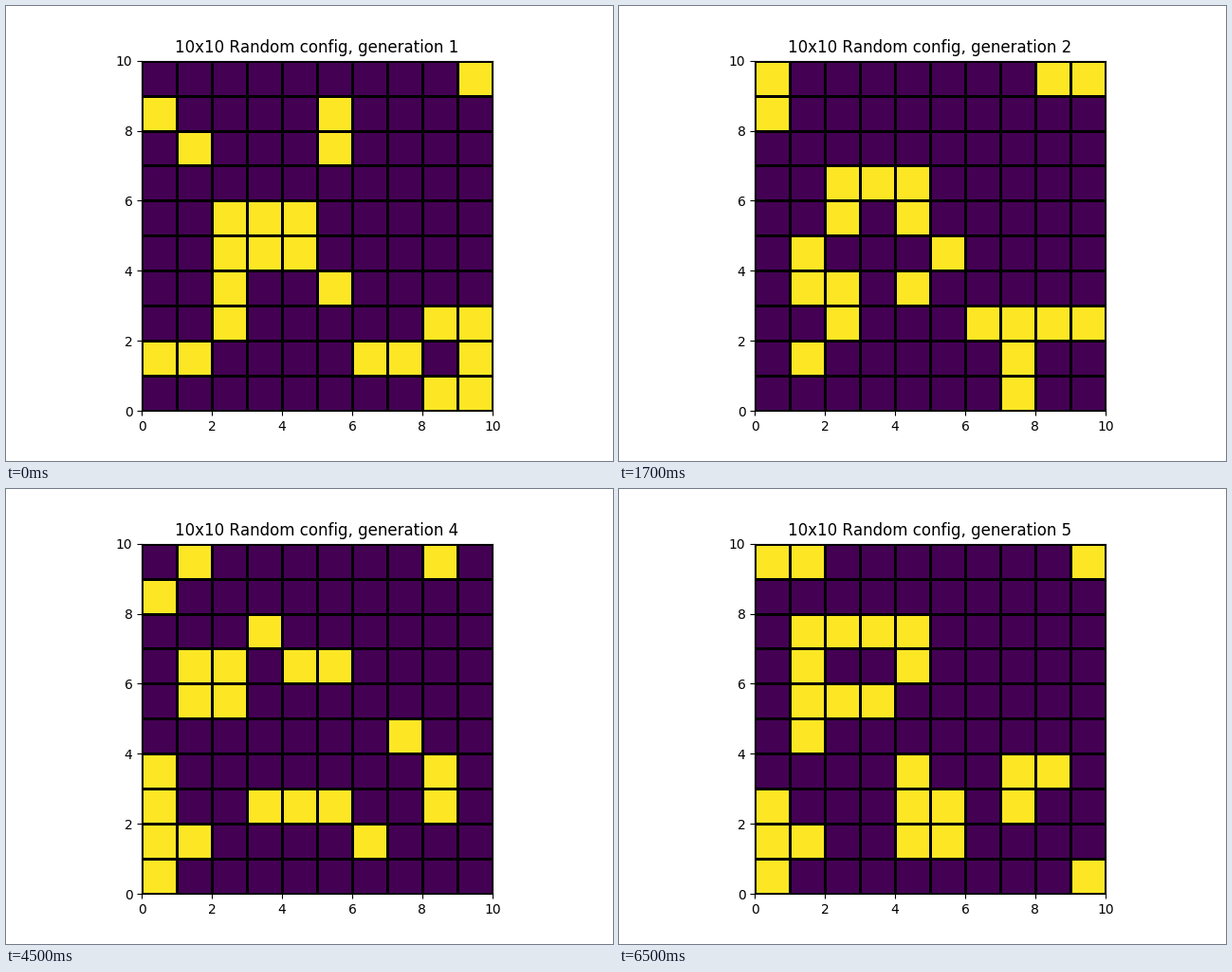
Recreate the animation shown at these times as a matplotlib script. Size 640 by 480 pixels, loop 8000 ms.

```python
import numpy as np
import matplotlib.pyplot as plt
from matplotlib.animation import FuncAnimation

SIZE = 10
GENERATIONS = 5
INTERVAL = 500        # ms per tick
TICKS = 16
TICKS_PER_GEN = 4     # the first generation is only shown for one tick

# Live columns of each row, bottom row first
SEED_ROWS = ["89", "01679", "289", "25", "234", "234", "", "15", "05", "9"]


def seed_grid():
    grid = np.zeros((SIZE, SIZE), dtype=int)
    for y, columns in enumerate(SEED_ROWS):
        for x in columns:
            grid[y, int(x)] = 1
    return grid


def step(grid):
    """Advance the Game of Life by one generation on a torus."""
    neighbours = sum(
        np.roll(grid, (dy, dx), axis=(0, 1))
        for dy in (-1, 0, 1)
        for dx in (-1, 0, 1)
        if (dy, dx) != (0, 0)
    )
    return ((neighbours == 3) | ((grid == 1) & (neighbours == 2))).astype(int)


history = [seed_grid()]
while len(history) < GENERATIONS:
    history.append(step(history[-1]))

plt.rcParams["text.kerning_factor"] = 6  # classic, unkerned text spacing

fig, ax = plt.subplots(figsize=(6.4, 4.8), dpi=100)
ax.set_aspect("equal")
mesh = ax.pcolormesh(history[0], cmap="viridis", vmin=0, vmax=1,
                     edgecolors="k", linewidth=2)
title = ax.set_title("")


def update(tick):
    generation = (tick + TICKS_PER_GEN - 1) // TICKS_PER_GEN
    mesh.set_array(history[generation])
    title.set_text(f"{SIZE}x{SIZE} Random config, generation {generation + 1}")
    return mesh, title


anim = FuncAnimation(fig, update, frames=TICKS, interval=INTERVAL,
                     repeat=True, repeat_delay=0)
plt.show()
```
